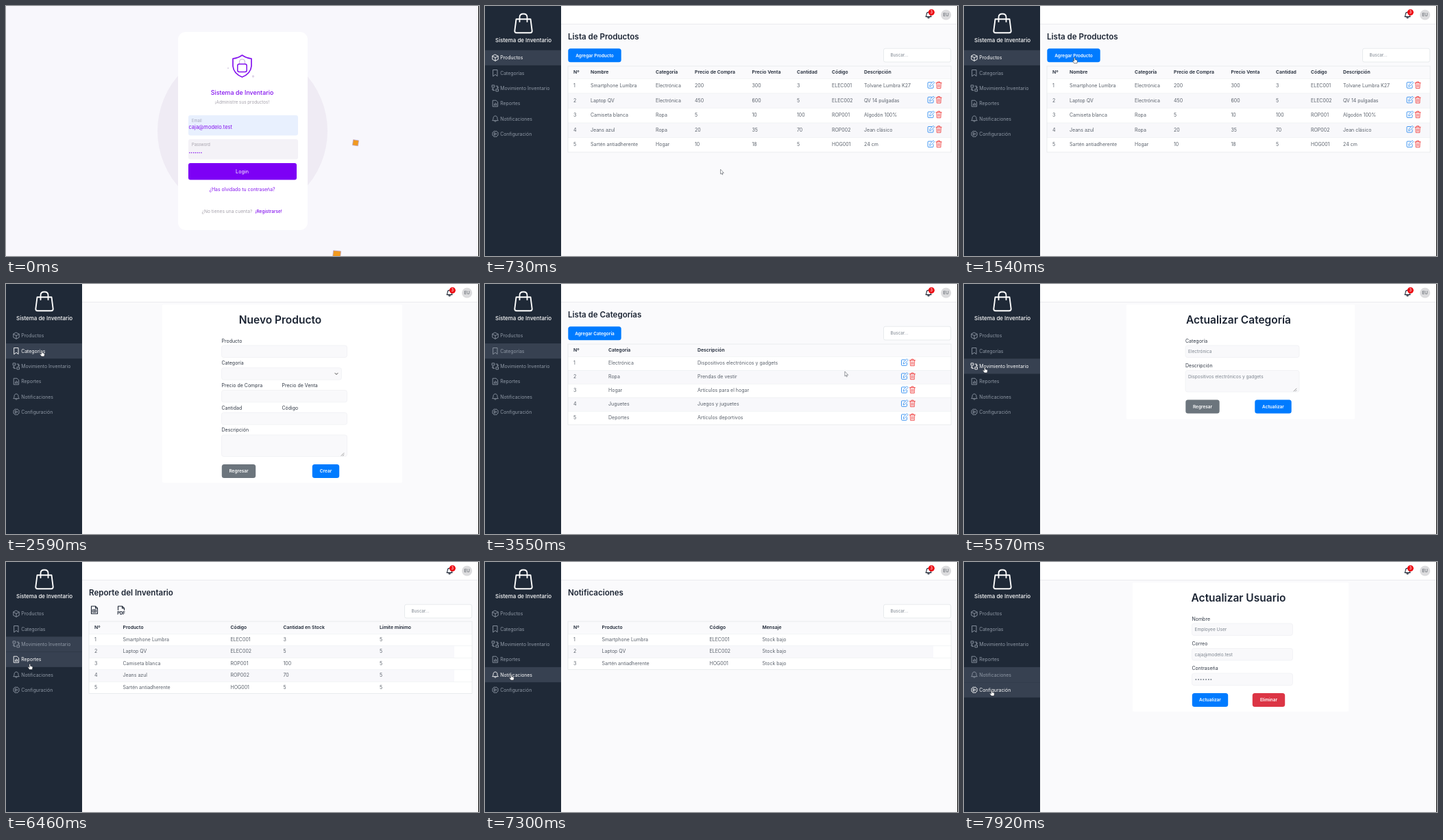
Write an HTML page that moves like this. It is 690 px wide and 366 px high and loops after 8 s.

```html
<!DOCTYPE html>
<html lang="es">
<head>
<meta charset="utf-8">
<title>Sistema de Inventario</title>
<style>
html, body { margin: 0; width: 100%; height: 100%; overflow: hidden; background: #fafafc; }
svg { display: block; width: 100vw; height: 100vh; }
text { font-family: Inter, Roboto, sans-serif; white-space: pre; }
</style>
</head>
<body>
<svg id="stage" viewBox="0 0 690 366"></svg>
<script>
const LOOP = 8000;
const INK = '#1b2433', CELL = '#5a616b', BLUE = '#007bff', RED = '#dc3545', GRAY = '#6c757d', PURPLE = '#8413ee';

const text = (x, y, s, size = 7, fill = CELL, weight = 400, anchor = 'start') =>
  `<text x="${x}" y="${y}" font-size="${size}" fill="${fill}" font-weight="${weight}" text-anchor="${anchor}">${s}</text>`;
const rect = (x, y, w, h, fill, r = 0, stroke = 'none', sw = .7) =>
  `<rect x="${x}" y="${y}" width="${w}" height="${h}" rx="${r}" fill="${fill}" stroke="${stroke}" stroke-width="${sw}"/>`;
const line = (d, color, w = 1, fill = 'none') =>
  `<path d="${d}" fill="${fill}" stroke="${color}" stroke-width="${w}" stroke-linecap="round" stroke-linejoin="round"/>`;
const at = (x, y, s) => `<g transform="translate(${x} ${y})">${s}</g>`;

const button = (x, y, w, label, fill) =>
  rect(x + .3, y + .3, w - .6, 19.9, fill, 3.5) + text(x + w / 2, y + 12.6, label, 6.5, '#fff', 600, 'middle');
const field = (x, y, w, h, value = '') =>
  rect(x, y, w, h, '#f9f9fb', 3, '#eeeff3') + text(x + 4, y + 11.2, value, 6.55, '#7d858f');
const label = (x, y, s) => text(x, y, s, 7, '#303845');
const grip = (x, y) => line(`M${x - 4} ${y}l4-4m-1.5 4l1.5-1.5`, '#777', .7);

// Sidebar icons, centred on 0,0
const gear = 'M' + Array.from({ length: 16 }, (_, i) => {
  const a = i * Math.PI / 8, r = i % 2 ? 4.6 : 3.8;
  return `${(r * Math.cos(a)).toFixed(1)} ${(r * Math.sin(a)).toFixed(1)}`;
}).join('L') + 'Z';
const BELL = 'M-4 2.4C-2.8 1.2-3-.8-2.8-1.8C-2.3-4.8 2.3-4.8 2.8-1.8C3-.8 2.8 1.2 4 2.4ZM-1.2 3.8Q0 5 1.2 3.8';
const MENU = [
  ['Productos', 'M0-4.6L4.2-2.4V2.4L0 4.6L-4.2 2.4V-2.4ZM-4.2-2.4L0-.2L4.2-2.4M0-.2V4.6'],
  ['Categorías', 'M-3-4.6H3V4.6L0 2.2L-3 4.6Z'],
  ['Movimiento Inventario', 'M-4.5-4.5h3.2v3.2h-3.2ZM1.3 1.3h3.2v3.2H1.3ZM1-3.2H3.6V-.4M2.4-1.4l1.2 1.2l1.2-1.2M-1 3.2H-3.6V.6M-4.8 1.6l1.2-1.2l1.2 1.2'],
  ['Reportes', 'M-3.4-4.5H1.2L3.6-2V4.5H-3.4ZM-1.5 2.6V1M0 2.6V-.8M1.6 2.6V.2'],
  ['Notificaciones', BELL],
  ['Configuración', gear + 'M-1.2-1.8L2 0L-1.2 1.8Z']
];
const SIDE = 111;
const itemY = i => 75.8 + i * 22.3;

const bag = line('M45.500 19.300H66.500L68.700 36.500Q68.700 39.200 66 39.200H46Q43.300 39.200 43.300 36.500Z', '#fff', 1.9) +
  line('M50.500 23V16.500Q50.500 11.500 56 11.500T61.500 16.500V23', '#fff', 1.8);

const sidebar = rect(0, 0, SIDE, 366, '#1f2937') + bag +
  text(56, 52.7, 'Sistema de Inventario', 7.95, '#fff', 500, 'middle') +
  MENU.map(([name, d], i) => `<g class="item">${rect(0, itemY(i) - 11.1, SIDE, 22.2, '#374151')}` +
    `<g class="ink" color="#8f98a5">${at(15, itemY(i), line(d, 'currentColor', .9))}` +
    text(22.2, itemY(i) + 2.5, name, 6.9, 'currentColor') + '</g></g>').join('');

const topbar = rect(SIDE, 0, 690 - SIDE, 26, '#fff') + rect(SIDE, 26, 690 - SIDE, .7, '#e4e5ea') +
  at(647, 13.2, line(BELL, INK, 1.1)) + '<circle cx="651.300" cy="9.200" r="4.500" fill="#ee0a12"/>' +
  text(651.3, 11.2, '3', 5.5, '#fff', 500, 'middle') +
  '<circle cx="672.500" cy="13" r="7.500" fill="#dcdcde"/>' + text(672.5, 15.3, 'EU', 6.3, '#4c525b', 400, 'middle');

const pencil = line('M1-4H-3.500Q-4.500-4-4.500-3V3.500Q-4.500 4.500-3.500 4.500H2.500Q3.500 4.500 3.500 3.500V.5', '#2d8cf0', .9) +
  line('M-1.800 1.800L-1.300-.5L3.500-5.200L5.200-3.500L.5 1.200Z', '#2d8cf0', .8);
const trash = line('M-4-3.200H4M-1.500-3.200V-4.800H1.500V-3.200M-3.200-3.200L-2.800 4.800H2.800L3.200-3.200M-1-1V3M1-1V3', '#f04545', .9);

const listHead = title => text(121, 48.5, title, 11.55, INK, 600) +
  rect(581.5, 62.2, 98, 19.8, '#fff', 2.5, '#dee2e6') + text(591.5, 74.4, 'Buscar...', 6.3, '#7d858f');

function table(y, headH, rowH, cols, heads, rows, iconX) {
  const h = headH + rowH * rows.length;
  let s = rect(121, y, 559, h, '#fff') + rect(121, y, 559, headH, '#fafafc');
  s += heads.map((name, i) => text(cols[i], y + headH / 2 + 2.3, name, 6.85, INK, 600)).join('');
  rows.forEach((row, n) => {
    const top = y + headH + n * rowH, mid = top + rowH / 2 - .5;
    s += rect(121, top, iconX ? 559 : 533, rowH, n % 2 ? '#f8f8fb' : '#fff') + rect(121, top, 559, .6, '#eceef1');
    s += [n + 1, ...row].map((c, i) => text(cols[i], mid + 2.6, c)).join('');
    if (iconX) s += at(iconX, mid - .6, pencil) + at(iconX + 11.5, mid - .6, trash);
  });
  return s + rect(121, y, 559, h, 'none', 0, '#e2e5e9');
}

const form = (x, w, h, title, body) => rect(x, 30, w, h, '#fff', 2) +
  text(x + w / 2 - 3, 58, title, 15.5, INK, 600, 'middle') + body;

const PHONE = 'Smartphone Lumbra', LAPTOP = 'Laptop QV', SHIRT = 'Camiseta blanca', JEANS = 'Jeans azul', PAN = 'Sartén antiadherente';
const CODES = ['ELEC001', 'ELEC002', 'ROP001', 'ROP002', 'HOG001'];
const STOCK = [3, 5, 100, 70, 5];

const login = rect(0, 0, 690, 366, '#f8f7fc') +
  '<circle cx="345" cy="183" r="124" fill="#efebf4"/>' +
  rect(251, 38, 189, 290, '#fff', 11) +
  line('M344.500 72Q351 76.500 358 77V88Q357 99 344.500 104Q332 99 331 88V77Q338 76.500 344.500 72Z', PURPLE, 1.7) +
  line('M340.500 85V82Q340.500 78 344.500 78T348.500 82V85', '#c9b9dc', 1.2) +
  rect(337.8, 85, 13.4, 11.5, '#fff', 2.5, PURPLE, 1.5) +
  '<circle cx="324" cy="91" r="1.200" fill="#e3dcea"/><circle cx="360.500" cy="103" r="1.700" fill="#ded5e8"/>' +
  text(344.5, 130.3, 'Sistema de Inventario', 8.9, PURPLE, 500, 'middle') +
  text(344.5, 143, '¡Administre sus productos!', 6.3, '#a5a1ab', 400, 'middle') +
  rect(266, 160, 160, 29.5, '#e8f0fe', 3) + text(271, 170, 'Email', 5.8, '#a3a4b8') +
  text(266.5, 179.8, 'caja@modelo.test', 7.5, PURPLE) +
  rect(266, 195, 160, 29.5, '#f4f2f7', 3) + text(271, 205, 'Password', 5.8, '#a5a1ab') +
  text(266.5, 215.5, '•••••••', 5, PURPLE) +
  rect(266, 230, 158, 24.5, '#7d00f5', 3) + text(344.5, 244.7, 'Login', 7.2, '#fff', 400, 'middle') +
  text(344.5, 271, '¿Has olvidado tu contraseña?', 6.9, PURPLE, 400, 'middle') +
  text(285.5, 303, '¿No tienes una cuenta?', 6.7, '#a5a1ab') + text(363.5, 303, '¡Registrarse!', 6.5, PURPLE, 500) +
  [8, 11].map(n => `<g class="chip">${rect(-n / 2, -n / 2, n, n, '#f29a1f', 0, '#b9a3c9')}</g>`).join('');

const products = listHead('Lista de Productos') + button(121, 62, 78, 'Agregar Producto', BLUE) +
  table(88, 18, 21.6, [129, 154, 249, 306, 389.5, 455, 506, 553],
    ['Nº', 'Nombre', 'Categoría', 'Precio de Compra', 'Precio Venta', 'Cantidad', 'Código', 'Descripción'],
    [[PHONE, 'Electrónica', 200, 300, 3, CODES[0], 'Tolvane Lumbra K27'],
     [LAPTOP, 'Electrónica', 450, 600, 5, CODES[1], 'QV 14 pulgadas'],
     [SHIRT, 'Ropa', 5, 10, 100, CODES[2], 'Algodón 100%'],
     [JEANS, 'Ropa', 20, 35, 70, CODES[3], 'Jean clásico'],
     [PAN, 'Hogar', 10, 18, 5, CODES[4], '24 cm']], 650.5);

const newProduct = form(228, 350, 261, 'Nuevo Producto',
  label(314.5, 85.7, 'Producto') + field(314.5, 90, 183, 17.5) +
  label(314.5, 118.3, 'Categoría') + field(314.5, 122.7, 175, 17.5) + line('M480 130.500l2 2l2-2', '#444', 1) +
  label(314.5, 151, 'Precio de Compra') + label(402.5, 151, 'Precio de Venta') + field(314.5, 155.5, 183, 17.5) +
  label(314.5, 183.8, 'Cantidad') + label(402.5, 183.8, 'Código') + field(314.5, 188.3, 183, 17.5) +
  label(314.5, 216.3, 'Descripción') + field(314.5, 221, 183, 31.5) + grip(493, 251.5) +
  button(314.5, 263.7, 50, 'Regresar', GRAY) + button(446.5, 263.7, 40, 'Crear', BLUE));

const categories = listHead('Lista de Categorías') + button(121, 62, 78, 'Agregar Categoría', BLUE) +
  table(88, 18, 20, [129, 180, 310], ['Nº', 'Categoría', 'Descripción'],
    [['Electrónica', 'Dispositivos electrónicos y gadgets'], ['Ropa', 'Prendas de vestir'], ['Hogar', 'Artículos para el hogar'],
     ['Juguetes', 'Juegos y juguetes'], ['Deportes', 'Artículos deportivos']], 612);

const editCategory = form(237, 333, 168, 'Actualizar Categoría',
  label(323, 85.7, 'Categoría') + field(323, 90, 166, 17.5, 'Electrónica') +
  label(323, 122, 'Descripción') + field(323, 126.5, 166, 31.5, 'Dispositivos electrónicos y gadgets') + grip(485, 157) +
  button(323, 169.3, 50, 'Regresar', GRAY) + button(424, 169.3, 54, 'Actualizar', BLUE));

const moves = listHead('Movimiento de Inventario') + button(121, 62, 78, 'Agregar', BLUE) +
  table(88, 18, 21.6, [129, 170, 300, 400, 500], ['Nº', 'Producto', 'Código', 'Tipo', 'Cantidad'],
    [PHONE, LAPTOP, SHIRT, JEANS, PAN].map((p, i) => [p, CODES[i], i % 2 ? 'Salida' : 'Entrada', STOCK[i]]));

const sheet = line('M-4.500-5.500H1.500L4.500-2.500V5.500H-4.500ZM1.500-5.500V-2.500H4.500', INK, 1.1);
const reports = listHead('Reporte del Inventario') +
  at(129, 70.2, sheet + line('M-2.500-.5H2.500V3.500H-2.500ZM-2.500 1.500H2.500M0-.5V3.500', INK, .8)) +
  at(168, 70.2, line('M-4.500 0V-5.500H1.500L4.500-2.500V0M1.500-5.500V-2.500H4.500', INK, 1.1) + text(0, 6.5, 'PDF', 6, INK, 700, 'middle')) +
  table(87, 18, 17.5, [129, 170.5, 327.5, 404.5, 545], ['Nº', 'Producto', 'Código', 'Cantidad en Stock', 'Límite mínimo'],
    [PHONE, LAPTOP, SHIRT, JEANS, PAN].map((p, i) => [p, CODES[i], STOCK[i], 5]));

const notices = listHead('Notificaciones') +
  table(87, 18, 17.5, [129, 170.5, 327.5, 404.5], ['Nº', 'Producto', 'Código', 'Mensaje'],
    [[PHONE, CODES[0], 'Stock bajo'], [LAPTOP, CODES[1], 'Stock bajo'], [PAN, CODES[4], 'Stock bajo']]);

const settings = form(246, 315, 189, 'Actualizar Usuario',
  label(332.5, 85.7, 'Nombre') + field(332.5, 90, 147, 17.5, 'Employee User') +
  label(332.5, 122, 'Correo') + field(332.5, 126.5, 147, 17.5, 'caja@modelo.test') +
  label(332.5, 158.3, 'Contraseña') + field(332.5, 163, 147, 17.5, '•••••••') +
  button(332.5, 191.7, 53, 'Actualizar', BLUE) + button(420.5, 191.7, 48, 'Eliminar', RED));

// Start time and content of each screen
const PAGES = [[0, login], [730, products], [1640, newProduct], [2700, categories], [4470, editCategory],
  [5730, moves], [6460, reports], [7300, notices], [7900, settings]];

// Start time and focused menu item
const FOCUS = [[0, 0], [1640, -1], [2550, 1], [5500, 2], [6490, 3], [7250, 4], [7960, 5]];

// Pointer stops: time, x, y
const STOPS = [[910, 345, 243], [1510, 162, 79.8], [1730, 162, 79.8], [2490, 53, 102], [2780, 53, 102], [3730, 575, 135],
  [4000, 575, 135], [4120, 613, 115.5], [4560, 613, 115.5], [5480, 31, 126], [5780, 31, 126], [6040, 35.5, 153.5],
  [6500, 35.5, 153.5], [6740, 37, 160], [6890, 37, 160], [7140, 39, 169], [7400, 39, 169], [7720, 41, 192]];

const hand = line('M-1.600-3.800Q-.7-4.800.1-3.800V-1.200L2.600-.6Q3.600-.2 3.400 1L2.800 4H-1.300L-3.600.8Q-3.300-.5-1.600.6Z', '#22272f', .6, '#fff');
const arrow = line('M-1.500-3.500V3L0 1.700L1 4L2 3.600L1 1.400H3Z', '#6d7279', .7, '#fff');

const stage = document.getElementById('stage');
stage.innerHTML = rect(0, 0, 690, 366, '#fafafc') + `<g id="shell">${sidebar + topbar}</g>` +
  PAGES.map(p => `<g class="page">${p[1]}</g>`).join('') +
  `<g id="pointer"><g id="hand">${hand}</g><g id="arrow">${arrow}</g></g>` + rect(689, 0, 1, 366, '#000');

const all = q => [...stage.querySelectorAll(q)];
const [shell, pointer, handEl, arrowEl] = ['shell', 'pointer', 'hand', 'arrow'].map(id => document.getElementById(id));
const pages = all('.page'), items = all('.item'), chips = all('.chip');
const show = (el, on) => el.setAttribute('display', on ? 'inline' : 'none');
const lastIndex = (list, t) => list.reduce((n, e, i) => e[0] <= t ? i : n, 0);
const ease = u => u * u * (3 - 2 * u);

function pointerAt(t) {
  const i = lastIndex(STOPS, t), a = STOPS[i], b = STOPS[i + 1] || a;
  const u = b === a ? 0 : ease(Math.min(1, Math.max(0, (t - a[0]) / (b[0] - a[0]))));
  return [a[1] + (b[1] - a[1]) * u, a[2] + (b[2] - a[2]) * u];
}

function draw(t) {
  const page = lastIndex(PAGES, t), focus = FOCUS[lastIndex(FOCUS, t)][1];
  const [x, y] = pointerAt(t);
  const hover = x < SIDE ? Math.floor((y - itemY(0) + 11.1) / 22.3) : page === 1 ? 0 : -1;
  const onButton = (page === 1 || page === 3) && x > 121 && x < 199 && y > 62 && y < 83;
  const onEdit = page === 3 && x > 606 && y < 124;
  const link = x < SIDE || onButton || onEdit;

  pages.forEach((el, i) => show(el, i === page));
  show(shell, page > 0);
  show(pointer, page > 0);
  show(handEl, link);
  show(arrowEl, !link);
  pointer.setAttribute('transform', `translate(${x} ${y})`);
  items.forEach((el, i) => {
    show(el.firstChild, i === focus || i === hover);
    el.lastChild.setAttribute('color', i === hover ? '#fff' : '#8f98a5');
  });

  const drift = Math.max(0, t - 100) / 600;
  chips[0].setAttribute('transform', `translate(${510 - 2 * drift} ${200.3 - 10 * drift}) rotate(${8 + 25 * drift})`);
  chips[1].setAttribute('transform', `translate(${482.5 - 2 * drift} ${364 - 12 * drift}) rotate(${6 + 25 * drift})`);
}

function tick(now) {
  draw(now % LOOP);
  requestAnimationFrame(tick);
}
draw(0);
requestAnimationFrame(tick);
</script>
</body>
</html>
```
